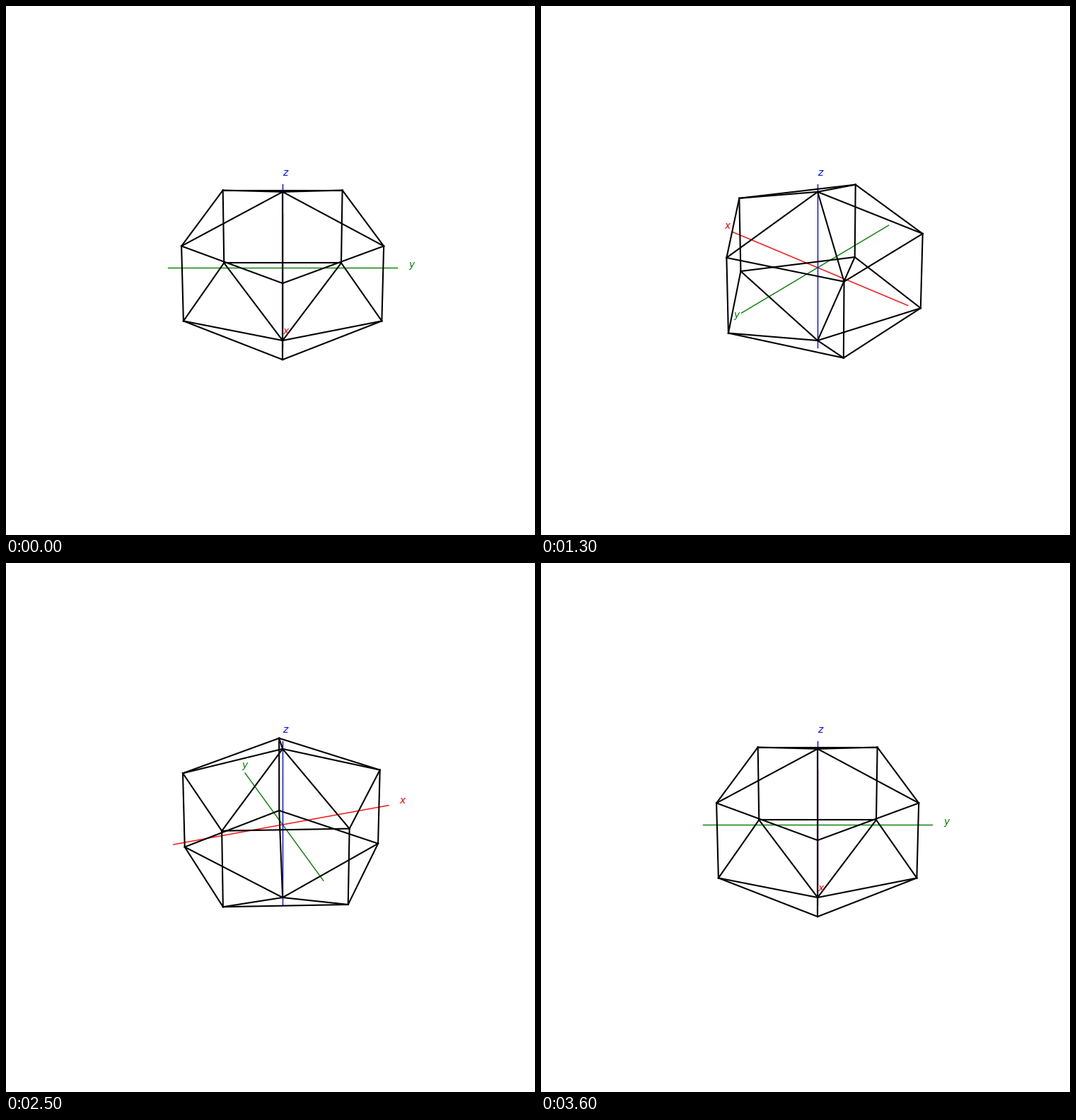
Recreate the animation shown at these times as a matplotlib script. Size 748x748 px, loop 3.7 s.

```python
import numpy as np
import matplotlib.pyplot as plt
from matplotlib.animation import FuncAnimation

SIZE, DPI = 748, 100
FRAMES, STEP, INTERVAL = 37, 10, 100

# Camera: perspective view from a distance of 10 units, 30 degrees up
DIST = 10
ELEV = np.radians(30)
SCALE = 0.77 * SIZE / 0.185
CENTER = np.array([0.5125, 0.495]) * SIZE + 0.0025 * SCALE

# Elongated pentagonal bipyramid, with axes 10 % longer than the solid
HALF_Z = 3 / 7
AXIS_XY = 4 / 7 / 1.1
RADIUS = AXIS_XY / 1.1
APEX = HALF_Z / 1.1
RING_Z = APEX / 2
AXES = [("x", "red", (AXIS_XY, 0, 0)),
        ("y", "green", (0, AXIS_XY, 0)),
        ("z", "blue", (0, 0, HALF_Z))]


def ring(z):
    t = 2 * np.pi * np.arange(5) / 5
    return np.column_stack([RADIUS * np.cos(t), RADIUS * np.sin(t), np.full(5, z)])


def build_edges():
    top, bottom = ring(RING_Z), ring(-RING_Z)
    tip = np.array([0, 0, APEX])
    edges = []
    for i in range(5):
        j = (i + 1) % 5
        edges += [(top[i], top[j]), (bottom[i], bottom[j]), (top[i], bottom[i]),
                  (tip, top[i]), (-tip, bottom[i])]
    return np.array(edges)


def project(points, azim):
    x, y, z = np.moveaxis(np.asarray(points, float), -1, 0)
    toward = x * np.cos(azim) + y * np.sin(azim)
    right = y * np.cos(azim) - x * np.sin(azim)
    up = z * np.cos(ELEV) - toward * np.sin(ELEV)
    depth = toward * np.cos(ELEV) + z * np.sin(ELEV)
    return CENTER + SCALE * np.stack([right, up], -1) / (DIST - depth)[..., None]


fig = plt.figure(figsize=(SIZE / DPI, SIZE / DPI), dpi=DPI, facecolor="white")
ax = fig.add_axes([0, 0, 1, 1])
ax.set(xlim=(0, SIZE), ylim=(0, SIZE))
ax.axis("off")

ends = np.array([end for _, _, end in AXES])
axis_segments = np.stack([-ends, ends], axis=1)
axis_lines = [ax.plot([], [], color=c, lw=1)[0] for _, c, _ in AXES]
labels = [ax.text(0, 0, f"${name}$", color=c, fontsize=10) for name, c, _ in AXES]

edges = build_edges()
edge_lines = [ax.plot([], [], color="black", lw=1.5)[0] for _ in edges]


def update(frame):
    azim = np.radians(frame * STEP)
    for line, seg in zip(axis_lines, project(axis_segments, azim)):
        line.set_data(seg[:, 0], seg[:, 1])
    for line, seg in zip(edge_lines, project(edges, azim)):
        line.set_data(seg[:, 0], seg[:, 1])
    for label, pos in zip(labels, project(1.1 * ends, azim)):
        label.set_position(pos)
    return axis_lines + edge_lines + labels


anim = FuncAnimation(fig, update, frames=FRAMES, interval=INTERVAL,
                     repeat=True, repeat_delay=0)
plt.show()
```
